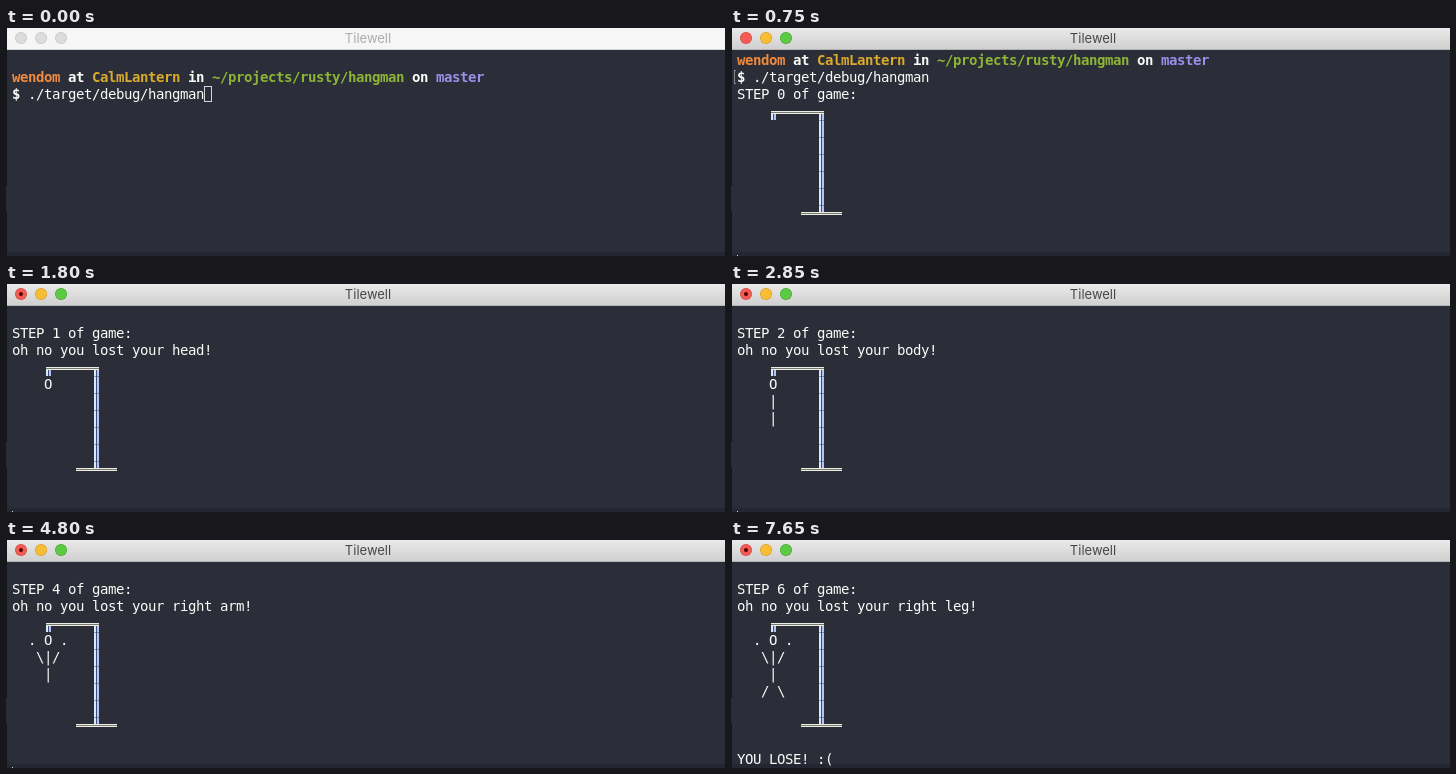
Write an HTML page with a canvas that moves like this. It is 719 by 228 pixels and loops after 8 s.

```html
<!DOCTYPE html>
<html lang="en">
<head>
<meta charset="utf-8">
<title>Hangman</title>
<style>
  html, body { margin: 0; width: 100%; height: 100%; overflow: hidden; background: #2b2e38; }
  canvas { display: block; }
</style>
</head>
<body>
<canvas id="stage" width="719" height="228"></canvas>
<script>
const ctx = document.getElementById('stage').getContext('2d');
const LOOP = 8000, CELL = 8, ROW = 17;
const WHITE = '#fbfbf8';
const stepTimes = [750, 1800, 2850, 3750, 4800, 5850, 6750];
const lostParts = ['', 'head', 'body', 'left arm', 'right arm', 'left leg', 'right leg'];
const cursorOff = [[1650, 1800], [2700, 2850], [4650, 4800], [5700, 5850], [7650, LOOP]];
// Body pieces: step they appear in, row, column, glyph
const body = [
  [1, 5, 4, 'O'], [2, 6, 4, '|'], [2, 7, 4, '|'],
  [3, 5, 2, '.'], [3, 6, 3, '\\'], [4, 5, 6, '.'], [4, 6, 5, '/'],
  [5, 8, 3, '/'], [6, 8, 5, '\\']
];
const prompt = [
  ['wendom', '#f08b3e'], [' at ', WHITE], ['CalmLantern', '#d9aa2c'], [' in ', WHITE],
  ['~/projects/rusty/hangman', '#8db535'], [' on ', WHITE], ['master', '#9a90ea']
];

function rect(x, y, w, h, color) {
  ctx.fillStyle = color;
  ctx.fillRect(x, y, w, h);
}

function dot(x, y, r, color) {
  ctx.fillStyle = color;
  ctx.beginPath();
  ctx.arc(x, y, r, 0, Math.PI * 2);
  ctx.fill();
}

function print(row, col, text, color = WHITE, bold = false) {
  ctx.font = `${bold ? 'bold ' : ''}14px "DejaVu Sans Mono", monospace`;
  ctx.fillStyle = color;
  ctx.textAlign = 'left';
  [...text].forEach((c, i) => ctx.fillText(c, 6 + (col + i) * CELL, 20 + row * ROW));
}

function drawWindow(active, hover) {
  rect(0, 0, 719, 228, '#2b2e38');
  rect(0, 224, 719, 4, '#242631');
  rect(0, 0, 1, 158, '#14161c');
  rect(0, 183, 1, 45, '#14161c');

  const bar = ctx.createLinearGradient(0, 0, 0, 21);
  bar.addColorStop(0, active ? '#e9e9e9' : '#f6f6f6');
  bar.addColorStop(1, active ? '#d0d0d0' : '#f6f6f6');
  rect(1, 0, 718, 21, bar);
  rect(1, 21, 718, 1, active ? '#b4b4b4' : '#d4d4d4');

  const fills = active ? ['#f25c54', '#f8bd35', '#5dca43'] : Array(3).fill('#dcdcdc');
  const rims = active ? ['#dc4840', '#dfa023', '#42ad30'] : Array(3).fill('#c8c8c8');
  fills.forEach((fill, i) => {
    dot(15 + i * 20, 10, 6, rims[i]);
    dot(15 + i * 20, 10, 5.2, fill);
  });
  if (hover) dot(15, 10, 2, '#4d0000');

  ctx.font = '13px Inter, "Liberation Sans", sans-serif';
  ctx.textAlign = 'center';
  ctx.fillStyle = active ? '#484848' : '#acacac';
  ctx.fillText('Tilewell', 362, 15);
}

function drawPrompt(row) {
  let col = 0;
  for (const [text, color] of prompt) {
    print(row, col, text, color, true);
    col += text.length;
  }
  print(row + 1, 0, '$', WHITE, true);
  print(row + 1, 2, './target/debug/hangman');
}

function doubleBeam(x, y, w) {
  rect(x, y, w, 3, '#77786f');
  rect(x, y, w, 1, '#efeee2');
  rect(x, y + 2, w, 1, '#efeee2');
}

function doublePost(x, y, h) {
  rect(x, y, 5, h, '#3f5178');
  rect(x, y, 2, h, '#d3eaff');
  rect(x + 3, y, 2, h, '#b9c4f4');
}

function drawGallows() {
  doublePost(40, 83, 9);
  doublePost(88, 83, 102);
  doubleBeam(40, 83, 53);
  doubleBeam(70, 184, 41);
  for (let y = 92; y < 184; y += ROW) rect(88, y, 5, 1, 'rgba(43,46,56,.4)');
}

function drawGame(step) {
  if (step === 0) {
    drawPrompt(1);
    rect(3, 42, 1, 14, '#85878d');
    rect(3, 42, 2, 1, '#85878d');
    rect(3, 55, 2, 1, '#85878d');
    print(3, 0, 'STEP 0 of game:');
  } else {
    print(2, 0, `STEP ${step} of game:`);
    print(3, 0, `oh no you lost your ${lostParts[step]}!`);
  }
  drawGallows();
  for (const [from, row, col, glyph] of body) {
    if (step >= from) print(row, col, glyph);
  }
  if (step === 6) print(12, 0, 'YOU LOSE! :(');
}

function draw(t) {
  const active = t >= 150;
  drawWindow(active, t >= 900);
  const step = stepTimes.filter(s => t >= s).length - 1;
  if (step >= 0) {
    drawGame(step);
    if (!cursorOff.some(([a, b]) => t >= a && t < b)) rect(6, 227, 1, 1, '#d8d8d8');
    return;
  }
  drawPrompt(2);
  if (active) {
    rect(198, 58, 1, 16, '#e6e6e6');
  } else {
    ctx.strokeStyle = '#d4d5d8';
    ctx.lineWidth = 1;
    ctx.strokeRect(198.5, 58.5, 7, 15);
  }
}

const start = performance.now();
function tick() {
  draw((performance.now() - start) % LOOP);
  requestAnimationFrame(tick);
}
tick();
</script>
</body>
</html>
```
